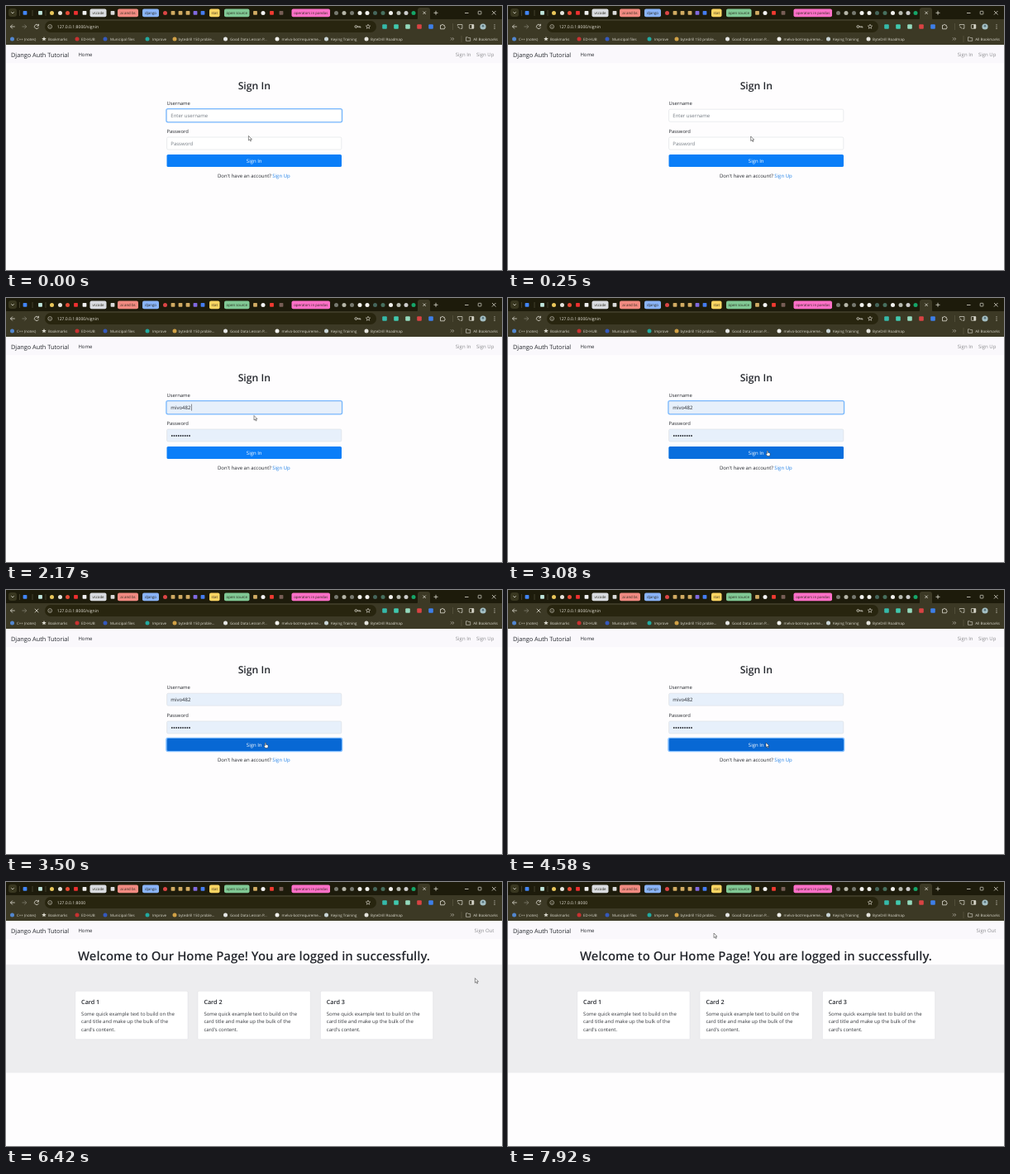
An HTML page for the animation above (8000 ms loop, 600x320 px).

```html
<!DOCTYPE html>
<html lang="en">
<head>
<meta charset="utf-8">
<title>Django Auth Tutorial</title>
<style>
html, body { margin: 0; width: 100%; height: 100%; overflow: hidden; background: #fefdfe; }
svg { display: block; width: 600px; height: 320px; font-family: "Open Sans", "Noto Sans", sans-serif; text-rendering: geometricPrecision; }
</style>
</head>
<body>
<svg id="stage" viewBox="0 0 600 320" xmlns="http://www.w3.org/2000/svg"></svg>
<script>
const INK = '#24272d', MUTED = '#8d8d90', LIGHT = '#dddbd0';

const text = (x, y, s, size = 6, fill = INK, extra = '') =>
  `<text x="${x}" y="${y}" font-size="${size}" fill="${fill}" ${extra}>${s}</text>`;
const rect = (x, y, w, h, fill, r = 0, extra = '') =>
  `<rect x="${x}" y="${y}" width="${w}" height="${h}" fill="${fill}" rx="${r}" ${extra}/>`;
const dot = (x, y, r, fill) => `<circle cx="${x}" cy="${y}" r="${r}" fill="${fill}"/>`;
const line = (d, color = LIGHT, w = 0.8, extra = '') =>
  `<path d="${d}" fill="none" stroke="${color}" stroke-width="${w}" ${extra}/>`;
const group = (id, body) => `<g id="${id}">${body}</g>`;
const star = (x, y, r, extra) => {
  const pts = Array.from({ length: 10 }, (_, i) => {
    const a = i * Math.PI / 5, q = i % 2 ? r * 0.45 : r;
    return `${x + q * Math.sin(a)},${y - q * Math.cos(a)}`;
  });
  return `<polygon points="${pts.join(' ')}" ${extra}/>`;
};
const bold = 'font-weight="600"', centered = 'text-anchor="middle"';

function tabStrip() {
  const groups = [
    [101.5, 20, 'vscode', '#dadce0'], [135, 25, 'ai and bs', '#f28b82'],
    [165, 20, 'django', '#8ab4f8'], [246, 12.5, 'stat', '#fdd663'],
    [264, 30.5, 'open source', '#81c995'], [345.5, 46.5, 'operators in pandas', '#ff70c8']
  ];
  const squares = [
    [23, '#4285f4'], [41.5, '#bfe5dc'], [84.5, '#ee3030'], [95, '#eeeeee'], [129, '#d9d9d9'],
    [202, '#d1ab62'], [211, '#d1ab62'], [220, '#d1ab62'], [229, '#8069df'], [238, '#447cf0'],
    [301.5, '#d1ab62'], [321.5, '#f03a31'], [333, '#775d55']
  ];
  const circles = [
    [55.5, '#e9c65a'], [65.5, '#e4e4dc'], [74.5, '#e64b35'], [192.5, '#db4545'], [311, '#f2f2f2'],
    [399.5, '#777970'], [409, '#b5b5a8'], [418.5, '#777970'], [428, '#f1f1ed'], [437, '#f1f1ed'],
    [446.5, '#45665b'], [456, '#47705f'], [465.5, '#f1f1ed'], [475, '#b8bbb1'], [484, '#cccccc'], [493, '#15a568']
  ];
  return rect(0, 0, 600, 18, '#1d1b0b')
    + rect(3, 3, 10, 10, '#393720', 3) + line('M6.3 7.3l1.7 1.7 1.7-1.7')
    + line('M16.5 5v7M32 5v7M48 5v7', '#68654e', 0.5)
    + groups.map(([x, w, s, c]) => rect(x, 3.6, w, 9.6, c, 2)
      + text(x + w / 2, 10, s, 4.4, '#29291d', centered)).join('')
    + squares.map(([x, c]) => rect(x - 2.4, 6, 4.8, 4.8, c, 0.8)).join('')
    + circles.map(([x, c]) => dot(x, 8.4, 2.5, c)).join('')
    + `<path d="M496 17q2 0 2-3V5q0-3 3-3h9q3 0 3 3v9q0 3 2 3z" fill="#3c3925"/>`
    + line('M504.4 6.6l3.4 3.4m0-3.4l-3.4 3.4M517.5 8.3h5M520 5.8v5M555 8.5h4.5M588 6l4.5 4.5m0-4.5l-4.5 4.5')
    + rect(571.2, 6.3, 3.7, 3.7, 'none', 0.5, `stroke="${LIGHT}" stroke-width=".7"`);
}

function toolbar() {
  const extensions = [[458, '#35b9aa'], [472, '#40c8ae'], [486, '#94d9bd'], [500, '#d84343'], [514, '#3d7fe9']];
  return rect(0, 16, 600, 31, '#3c3925')
    + rect(47, 18, 401, 14, '#28250f', 7)
    + line('M10.8 25H5.4m2.5-2.5L5.4 25l2.5 2.5')
    + line('M19.5 25h5.3m-2.5-2.5l2.5 2.5-2.5 2.5', '#827f70')
    + group('reload', line('M39 23.2a2.6 2.6 0 1 0 .5 2.7M39.5 21.8v2.3h-2.3'))
    + group('stop', line('M34.8 22.8l4.5 4.5m0-4.5l-4.5 4.5'))
    + line('M50.8 25a2.4 2.4 0 1 0 4.8 0a2.4 2.4 0 1 0-4.8 0M53.2 24.6v1.7', LIGHT, 0.6)
    + `<text id="url" x="61.8" y="26.8" font-size="5.08" fill="#e6e3d9"></text>`
    + group('key', line('M422 25a1.4 1.4 0 1 0 2.8 0a1.4 1.4 0 1 0-2.8 0M424.8 25h4v1.5M427 25v1.3'))
    + star(438, 25, 2.8, `fill="none" stroke="${LIGHT}" stroke-width=".6"`)
    + extensions.map(([x, c]) => rect(x - 2.8, 22.2, 5.6, 5.6, c, 1)).join('')
    + line('M525.5 23.3h1.5a1 1 0 0 1 2 0h1.3v1.5a1 1 0 0 1 0 2v1h-4.8z')
    + line('M540.5 21v8', '#69664f', 0.5)
    + line('M546.3 24v-1.5h5.6v4.8h-2.2M546.3 25.2a2.2 2.2 0 0 1 2.2 2.2', LIGHT, 0.7)
    + rect(560.4, 22.5, 5.4, 4.8, 'none', 0.4, `stroke="${LIGHT}" stroke-width=".7"`)
    + rect(563.4, 22.5, 2.4, 4.8, LIGHT)
    + dot(577, 25, 3.6, '#a4bfc4') + dot(577, 24.3, 1.3, '#55717a')
    + [22.8, 25, 27.2].map(y => dot(591, y, 0.6, LIGHT)).join('');
}

function bookmarks() {
  const items = [
    [7.5, 13, 'C++ (notes)', '#5286ce'], [46, 51, 'Bookmarks'], [86, 91, 'ED-HUB', '#c83131'],
    [120, 126, 'Municipal files', '#3559bd'], [171, 177, 'Improve', '#22a9a0'],
    [204, 208.5, 'bytedrill 150 proble...', '#d1a146'], [265.5, 271, 'Good Data Lesson P...', '#e5e6e5'],
    [328, 333.5, 'melvo-bot/requireme...', '#f1f1ed'], [387.5, 393, 'Keying Training', '#c9d5d7'],
    [436, 441, 'ByteDrill Roadmap', '#e4e3dc']
  ];
  return items.map(([ix, x, s, c]) =>
    (c ? dot(ix, 40, 2.5, c) : star(ix, 40, 2.9, `fill="${LIGHT}"`)) + text(x, 41.6, s, 4.45, LIGHT)).join('')
    + line('M538 38.3l1.6 1.6-1.6 1.6m2.2-3.2l1.6 1.6-1.6 1.6', LIGHT, 0.6)
    + line('M551 36v8', '#69664f', 0.5)
    + line('M556.5 37.8h2l.7.8h2.5v3.7h-5.2z', LIGHT, 0.6)
    + text(565.3, 41.6, 'All Bookmarks', 4.45, LIGHT);
}

const halo = (id, y, h) => rect(193.9, y - 0.6, 212.7, h + 1.2, 'none', 2, `id="${id}" stroke="#78b8ff" stroke-width="1.3"`);
const field = (y, id) => rect(194.6, y, 211.2, 15, '#fff', 1.6, `id="${id}" stroke="#d4d8dd" stroke-width=".5"`);

function signIn() {
  const dots = Array.from({ length: 9 }, (_, i) => dot(200.8 + i * 2.65, 167, 0.9, INK)).join('');
  return text(543.8, 60.8, 'Sign In', 6, MUTED) + text(569, 60.8, 'Sign Up', 6, MUTED)
    + text(300.3, 100.7, 'Sign In', 12.2, INK, `${bold} ${centered}`)
    + text(194.5, 119.8, 'Username', 5.85) + text(194.5, 153.7, 'Password', 5.85)
    + field(125.2, 'userBox') + field(159, 'passBox')
    + halo('userRing', 125.2, 15)
    + group('empty', text(199.3, 135, 'Enter username', 6, '#747b83') + text(199.3, 168.9, 'Password', 6, '#747b83'))
    + group('filled', text(199.3, 135, 'mivo482') + dots)
    + rect(224, 128.6, 0.5, 8, INK, 0, 'id="caret"')
    + rect(194.5, 180, 211.5, 15, '#0a7ef8', 1.6)
    + rect(194.5, 180, 211.5, 15, '#0868d4', 1.6, 'id="hover"')
    + halo('buttonRing', 180, 15)
    + text(300.2, 190, 'Sign In', 6, '#fff', centered)
    + text(256, 208.2, 'Don\'t have an account?') + text(322.3, 208.2, 'Sign Up', 6, '#2584e8');
}

function home() {
  const lines = ['Some quick example text to build on the', 'card title and make up the bulk of the', 'card\'s content.'];
  const card = (x, i) => rect(x, 132.2, 136.3, 58.6, '#fff', 1.5, 'stroke="#dcdde0" stroke-width=".5"')
    + text(x + 7.4, 148.2, `Card ${i + 1}`, 7.2, INK, bold)
    + lines.map((s, j) => text(x + 7.4, 161.8 + j * 9.4, s, 6.02, '#34373c')).join('');
  return text(566.6, 60.8, 'Sign Out', 6, MUTED)
    + text(300, 94.6, 'Welcome to Our Home Page! You are logged in successfully.', 14.92, INK, `${bold} ${centered}`)
    + rect(0, 100.2, 600, 131.2, '#ededef')
    + [83.7, 232, 380.4].map(card).join('');
}

const stage = document.getElementById('stage');
stage.innerHTML = rect(0, 0, 600, 320, '#fefdfe') + tabStrip() + toolbar() + bookmarks()
  + rect(0, 47, 600, 22.3, '#faf8fc')
  + text(6, 61.6, 'Django Auth Tutorial', 7.33) + text(87.4, 60.8, 'Home')
  + group('signIn', signIn()) + group('home', home())
  + group('pointer',
    group('arrow', '<path d="M0 0V5.6L1.3 4.4 2.3 6.5 3.2 6.1 2.3 4.1H4z" fill="#fff" stroke="#222" stroke-width=".5"/>')
    + group('hand', '<path d="M-.7.4q.7-.9 1.2 0v2l2.1.6q.6.3.5 1.2l-.5 2.3H-.3L-2 4q0-.9.7-.5l.6.5z" fill="#fff" stroke="#222" stroke-width=".45"/>'));

const el = id => document.getElementById(id);
const show = (id, on) => el(id).setAttribute('visibility', on ? 'inherit' : 'hidden');
const fade = (id, v) => el(id).setAttribute('opacity', v);
const clamp = v => Math.min(1, Math.max(0, v));

// Pointer path: [tick, x, y], 12 ticks per second
const path = [
  [0, 293.4, 157.4], [3, 293.7, 158], [21, 293.7, 158], [23, 300, 132], [25, 300, 135], [27, 300, 150],
  [35, 300, 150], [37, 314, 185], [42, 314, 185], [45, 312, 185], [59, 312, 185], [63, 312, 191],
  [67, 320, 216.5], [69, 320, 216.5], [72, 499, 238], [73, 499, 238], [74, 582, 206], [76, 582, 206],
  [77, 567.4, 116.6], [82, 567.4, 116.6], [83, 477, 99], [87, 477, 99], [90, 249, 62], [99, 249, 62]
];

function pointerAt(k) {
  const i = path.findIndex(p => p[0] > k);
  const [a, ax, ay] = path[i - 1], [b, bx, by] = path[i], u = (k - a) / (b - a);
  return [ax + (bx - ax) * u, ay + (by - ay) * u];
}

function draw(now) {
  const k = Math.floor((now % 8000 + 4) * 0.012);
  const loggedIn = k >= 56, filled = k >= 25;
  show('signIn', !loggedIn);
  show('key', !loggedIn);
  show('home', loggedIn);
  el('url').textContent = '127.0.0.1:8000' + (loggedIn ? '' : '/signin');
  const loading = k >= 40 && k < 58;
  show('reload', !loading);
  show('stop', loading);
  show('empty', !filled);
  show('filled', filled);
  for (const id of ['userBox', 'passBox']) el(id).setAttribute('fill', filled ? '#e7f0fb' : '#fff');
  show('caret', filled && k < 31);
  fade('userRing', k < 22 ? clamp(1 - k / 3) : Math.min(clamp((k - 22) / 2), clamp((41 - k) / 2)));
  fade('buttonRing', clamp((k - 39) / 2));
  fade('hover', k < 40 ? clamp((k - 35) / 2) * 0.75 : 1);
  const hand = k >= 37 && k < 45;
  show('hand', hand);
  show('arrow', !hand);
  el('pointer').setAttribute('transform', `translate(${pointerAt(k)})`);
  requestAnimationFrame(() => draw(performance.now()));
}
draw(performance.now());
</script>
</body>
</html>
```
